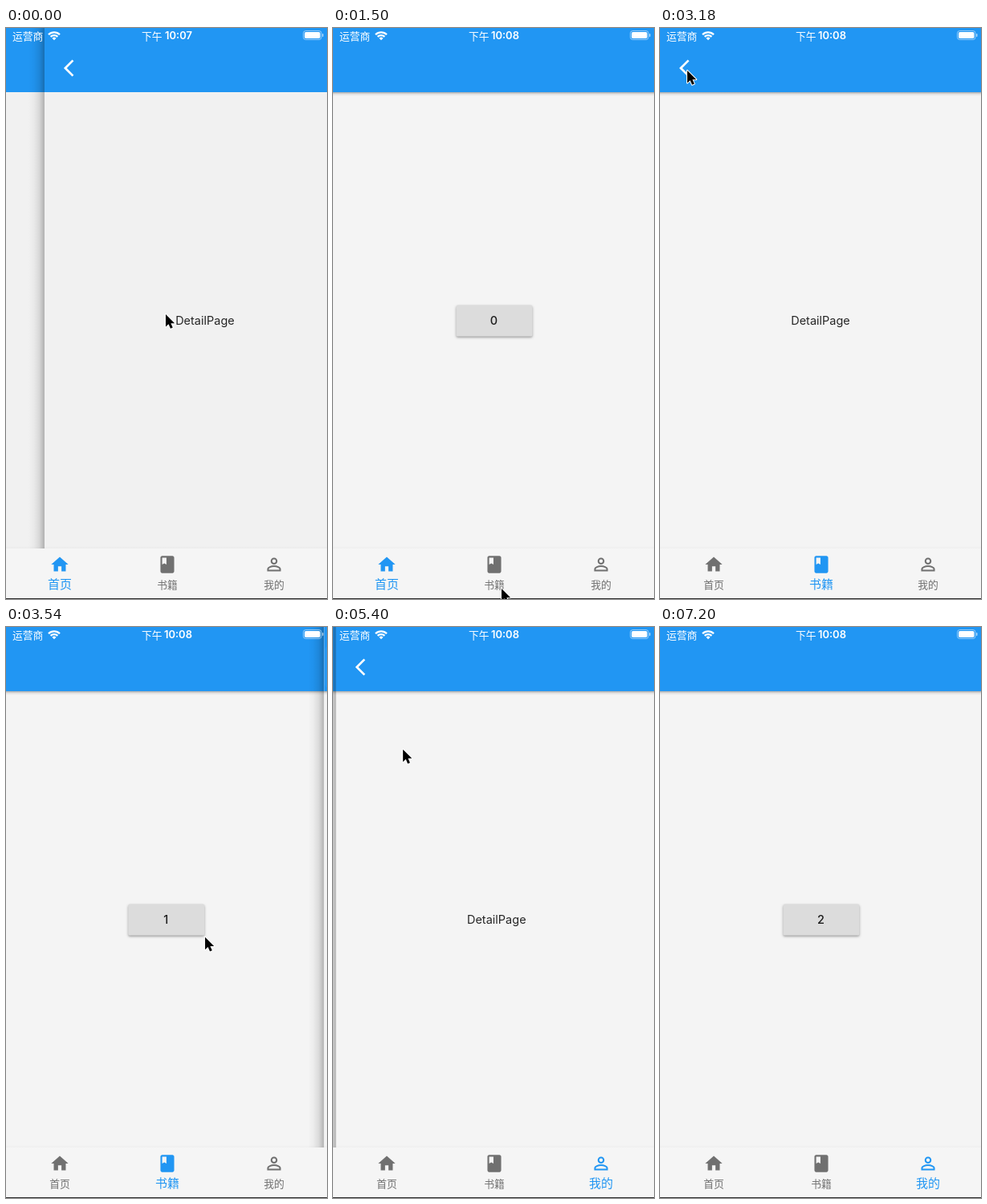
Animation of 400x712 px, one loop 7260 ms. Source, as an HTML page with a canvas:

```html
<!DOCTYPE html>
<html lang="zh">
<head>
<meta charset="utf-8">
<style>
html, body { margin: 0; width: 100%; height: 100%; overflow: hidden; background: #f4f4f4; }
canvas { display: block; width: 100vw; height: 100vh; }
</style>
</head>
<body>
<canvas id="stage"></canvas>
<script>
const W = 400, H = 712, LOOP = 7260, STEP = 60;
const BAR = 80, NAV = 649, BLUE = '#2196f3', GREY = '#707070';
const LATIN = 'Inter, "Noto Sans CJK SC", "Noto Sans CJK", sans-serif';
const CJK = '"Noto Sans CJK SC", "Noto Sans CJK", sans-serif';

const canvas = document.getElementById('stage');
const ctx = canvas.getContext('2d');
const ratio = window.devicePixelRatio || 1;
canvas.width = W * ratio;
canvas.height = H * ratio;

const visits = [{ push: -174, pop: 800 }, { push: 2388, pop: 3205 }, { push: 5066, pop: 5953 }];
const tabTaps = [-1000, 1680, 4140];
const SLIDE = 400;

const tabs = [
  { x: 67, label: '首页', path: new Path2D('M10 20v-6h4v6h5v-8h3L12 3 2 12h3v8z') },
  { x: 201, label: '书籍', path: new Path2D('M18 2H6c-1.1 0-2 .9-2 2v16c0 1.1.9 2 2 2h12c1.1 0 2-.9 2-2V4c0-1.1-.9-2-2-2zM6 4h5v8l-2.5-1.5L6 12z') },
  { x: 334, label: '我的', outline: true,
    path: new Path2D('M15.05 8a3.05 3.05 0 1 1-6.1 0a3.05 3.05 0 1 1 6.1 0zM4.95 19.05V17c0-1.4 3.6-3.05 7.05-3.05s7.05 1.65 7.05 3.05v2.05z') }
];
const arrow = new Path2D('M0 0V15.5L3.6 12.2 6 17.8 8.8 16.6 6.4 11.2H11.2Z');

const back = [34, 53];
const moves = [
  { start: 90, end: 600, from: [199, 357], to: back },
  { start: 900, end: 1500, from: back, to: [210, 699] },
  { start: 1740, end: 2340, from: [210, 699], to: [208, 359] },
  { start: 2530, end: 3120, from: [208, 359], to: back },
  { start: 3220, end: 4020, from: back, via: [231, 203], to: [335, 699] },
  { start: 4200, end: 4920, from: [335, 699], to: [202, 368] },
  { start: 5120, end: 5760, from: [202, 368], to: back }
];

const clamp = v => Math.max(0, Math.min(1, v));
const mix = (a, b, k) => a + (b - a) * k;
const bezier = (s, a, b) => 3 * s * (1 - s) ** 2 * a + 3 * s * s * (1 - s) * b + s ** 3;

// Fast start with a long settle: cubic-bezier(.35, .91, .33, .97).
function settle(k) {
  if (k <= 0) return 0;
  if (k >= 1) return 1;
  let lo = 0, hi = 1;
  for (let i = 0; i < 20; i++) {
    const mid = (lo + hi) / 2;
    if (bezier(mid, .35, .33) < k) lo = mid; else hi = mid;
  }
  return bezier(lo, .91, .97);
}

function pageCover(t) {
  const visit = visits.filter(v => t >= v.push).pop();
  return settle((t - visit.push) / SLIDE) - settle((t - visit.pop) / SLIDE);
}

function cursorAt(t) {
  const move = moves.filter(m => t >= m.start).pop() || moves[0];
  const k = 1 - (1 - clamp((t - move.start) / (move.end - move.start))) ** 2;
  return [0, 1].map(i => {
    const a = move.from[i], b = move.to[i], c = move.via ? move.via[i] : (a + b) / 2;
    return mix(mix(a, c, k), mix(c, b, k), k);
  });
}

function rect(x, y, w, h, color) {
  ctx.fillStyle = color;
  ctx.fillRect(x, y, w, h);
}

function roundRect(x, y, w, h, r, color) {
  ctx.fillStyle = color;
  ctx.beginPath();
  ctx.roundRect(x, y, w, h, r);
  ctx.fill();
}

function disc(x, y, r, color) {
  ctx.fillStyle = color;
  ctx.beginPath();
  ctx.arc(x, y, r, 0, 2 * Math.PI);
  ctx.fill();
}

function text(str, x, y, font, color, align = 'center') {
  ctx.font = font;
  ctx.fillStyle = color;
  ctx.textAlign = align;
  ctx.fillText(str, x, y);
}

function shade(x0, y0, x1, y1, ...alphas) {
  const g = ctx.createLinearGradient(x0, y0, x1, y1);
  alphas.forEach((a, i) => g.addColorStop(i / (alphas.length - 1), `rgba(0,0,0,${a})`));
  return g;
}

function drawPage(x, raised) {
  rect(x, 0, W, NAV, raised ? '#f4f4f4' : '#f1f1f1');
  rect(x, 0, W, BAR, BLUE);
  if (raised) rect(x, BAR, W, 5, shade(0, BAR, 0, BAR + 5, .3, .08, 0));
}

function drawButton(x, label, press) {
  const tone = Math.round(mix(220, 200, press));
  ctx.save();
  ctx.shadowColor = 'rgba(0,0,0,.35)';
  ctx.shadowBlur = 3 * ratio;
  ctx.shadowOffsetY = 1.5 * ratio;
  roundRect(x + 153.5, 345.5, 95, 39, 2, `rgb(${tone},${tone},${tone})`);
  ctx.restore();
  text(label, x + 200.5, 369.5, `500 14.5px ${LATIN}`, '#1c1c1c');
}

function drawDetail(x, t) {
  rect(x - 20, 0, 20, NAV, shade(x - 20, 0, x, 0, 0, .03, .1, .27));
  ctx.save();
  ctx.beginPath();
  ctx.rect(x, 0, W, NAV);
  ctx.clip();
  drawPage(x, t >= STEP);
  const age = t - visits.filter(v => t >= v.push).pop().pop;
  if (age >= 0) {
    ctx.save();
    ctx.beginPath();
    ctx.rect(x, 0, W, BAR);
    ctx.clip();
    const fade = 1 - clamp((age - 150) / 250);
    disc(x + 30, 50, 37 * mix(.4, 1, clamp(age / 100)), `rgba(255,255,255,${.13 * fade})`);
    ctx.restore();
  }
  ctx.strokeStyle = '#fff';
  ctx.lineWidth = 2.7;
  ctx.beginPath();
  ctx.moveTo(x + 35.5, 40.4);
  ctx.lineTo(x + 25.9, 50);
  ctx.lineTo(x + 35.5, 59.6);
  ctx.stroke();
  text('DetailPage', x + 200, 369.5, `400 14.5px ${LATIN}`, '#262626');
  ctx.restore();
}

function drawNav(t, active) {
  rect(0, NAV - 3, W, 3, shade(0, NAV - 3, 0, NAV, 0, .025));
  rect(0, NAV, W, H - NAV, '#f5f5f5');
  const age = t - tabTaps[active];
  if (age < 420) {
    ctx.save();
    ctx.beginPath();
    ctx.rect(0, NAV, W, H - NAV);
    ctx.clip();
    disc(tabs[active].x, 680, mix(12, 60, clamp(age / 300)), `rgba(33,150,243,${.1 * (1 - age / 420)})`);
    ctx.restore();
  }
  tabs.forEach((tab, i) => {
    const gain = clamp((t - tabTaps[active]) / 180);
    const k = i === active ? gain : i === active - 1 ? 1 - gain : 0;
    const color = k > .5 ? BLUE : GREY;
    ctx.save();
    ctx.translate(tab.x, 669);
    ctx.scale(1.067, 1.067);
    ctx.translate(-12, -12);
    ctx.fillStyle = ctx.strokeStyle = color;
    ctx.lineWidth = 1.9;
    if (tab.outline) ctx.stroke(tab.path); else ctx.fill(tab.path, 'evenodd');
    ctx.restore();
    text(tab.label, tab.x, 698.5, `400 ${mix(12.8, 15, k)}px ${CJK}`, color);
  });
  rect(0, 711, W, 1, '#303030');
}

function drawStatus(t) {
  text('运营商', 8, 14.5, `500 12.8px ${CJK}`, '#fff', 'left');
  text('下午', 169, 14.5, `500 12.8px ${CJK}`, '#fff', 'left');
  text(t < 840 ? '10:07' : '10:08', 232, 14.3, `600 13px ${LATIN}`, '#fff', 'right');

  ctx.strokeStyle = '#fff';
  ctx.lineWidth = 2.3;
  for (const r of [9.9, 6.2, 1.8]) {
    ctx.lineWidth = r < 2 ? 3.6 : 2.3;
    ctx.beginPath();
    ctx.arc(60, 15.3, r, -.75 * Math.PI, -.25 * Math.PI);
    ctx.stroke();
  }

  ctx.strokeStyle = 'rgba(255,255,255,.5)';
  ctx.lineWidth = 1;
  ctx.beginPath();
  ctx.roundRect(370.5, 3.5, 22.5, 11, 3);
  ctx.stroke();
  roundRect(372, 5, 19.5, 8, 1.7, '#fff');
  roundRect(394, 7, 1.5, 4, 1, 'rgba(255,255,255,.6)');
}

function drawCursor(t) {
  const [x, y] = cursorAt(t);
  ctx.save();
  ctx.translate(x, y);
  ctx.strokeStyle = '#fff';
  ctx.lineWidth = 2;
  ctx.lineJoin = 'round';
  ctx.stroke(arrow);
  ctx.fillStyle = '#000';
  ctx.fill(arrow);
  ctx.restore();
}

function draw(t) {
  ctx.setTransform(ratio, 0, 0, ratio, 0, 0);
  const active = tabTaps.filter(tap => t >= tap).length - 1;
  const cover = pageCover(t);
  const baseX = -cover * W / 3;
  const pushAge = t - visits[active].push;
  const press = pushAge >= 0 && pushAge < SLIDE ? 1 : 0;

  rect(0, 0, W, H, '#f4f4f4');
  drawPage(baseX, t >= STEP);
  if (t >= STEP) drawButton(baseX, String(active), press);
  if (cover > 0) drawDetail((1 - cover) * W, t);
  drawNav(t, active);
  drawStatus(t);
  if (t < 7200) drawCursor(t);
}

const begin = performance.now();
function tick() {
  const t = (performance.now() - begin) % LOOP;
  draw(Math.floor(t / STEP) * STEP);
  requestAnimationFrame(tick);
}
tick();
</script>
</body>
</html>
```
